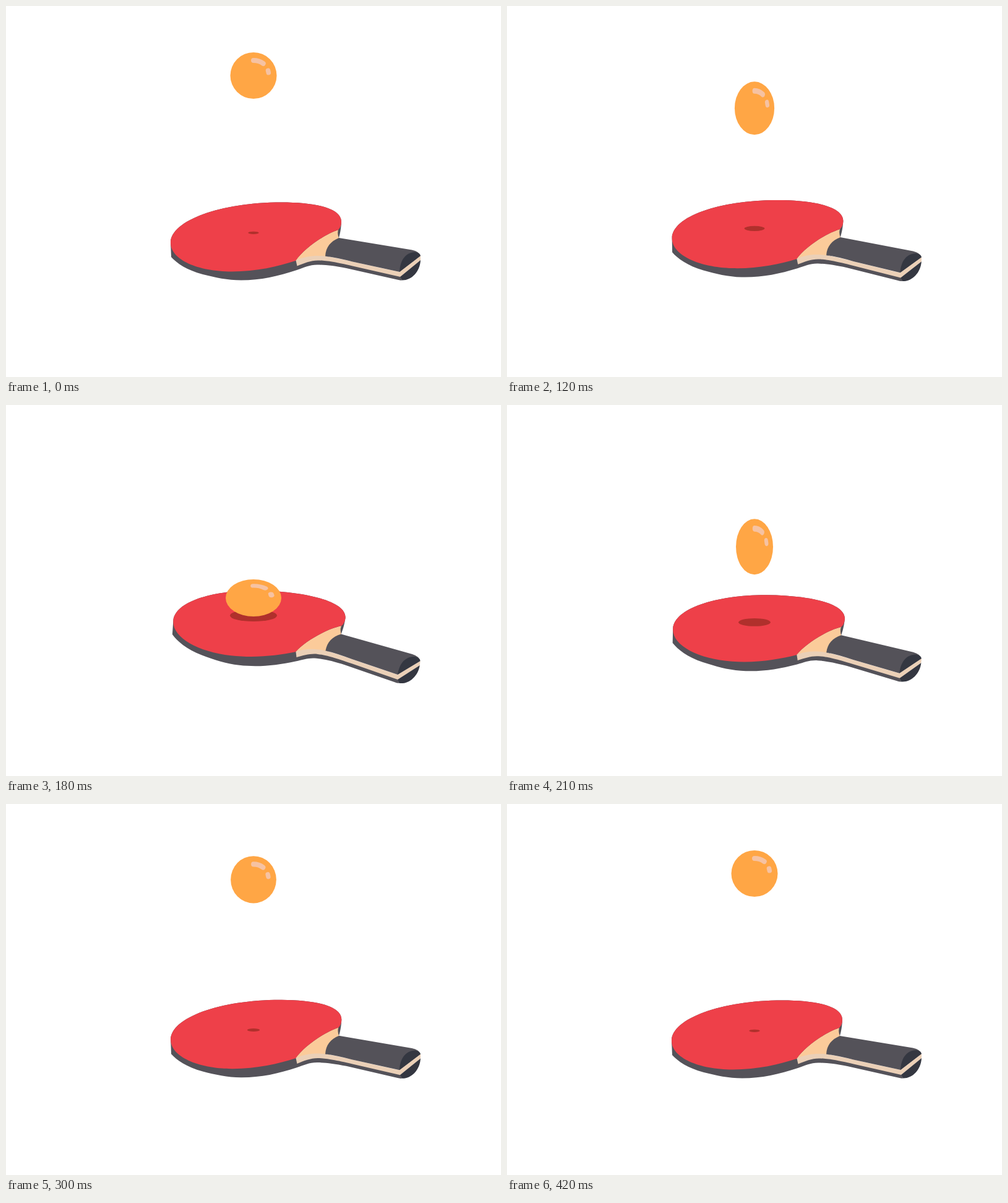
An HTML page that plays this animation: 800x600 px, repeating every 0.45 s.

```html
<!DOCTYPE html>
<html lang="en">
<head>
<meta charset="utf-8">
<title>Bouncing ball</title>
<style>
  html, body { margin: 0; width: 100%; height: 100%; overflow: hidden; background: #fff; }
  svg { display: block; width: 100vw; height: 100vh; }
  .red { fill: #ee4049; }
  .dark { fill: #545259; }
  .cap { fill: #343741; }
  .wood { fill: #fbcb9a; }
  .edge { fill: #ebd0b7; }
  .shadow { fill: #b0302c; }
  .ball { fill: #ffa645; }
  .shine { fill: none; stroke: #f6c2a2; stroke-linecap: round; }
</style>
</head>
<body>
<svg viewBox="0 0 800 600">
  <g id="paddle">
    <!-- rubber rim, neck and underside -->
    <path class="dark" d="M266 383C266 347 347 317.5 445 317.5C500 317.5 542 327 542 349
      C541.5 360 540 368 538 375L516 404L637 437L640 443.5Q637 444 632 442.5L550 424
      C530 420 516 418.5 503 418.5C490 418.5 482 423 470 427C440 437 412 443.5 380 443.5
      C358 443.5 338 439 318 434C292 427 276 416 267 406Z"/>
    <path class="wood" d="M468 412C482 392 515 369 537 362Q535 368 538 375L525 400L516 405L490 408Z"/>
    <path class="edge" d="M468.500 411.500C480 406 492 404 504 404Q512 404 518 405
      C540 408 560 414 636 430L670 404V411L637 438L560 420.500C530 413.500 516 411.500 504 411.500
      C492 411.500 482 416 470.500 420.500Z"/>
    <path class="dark" d="M516 404.500C517 390 524 381 538 375L656 394.500Q668 397 669.500 404L636 430
      L560 413.500Q535 407 516 404.500Z"/>
    <path class="cap" d="M636 430C637 410 646 399 661 398Q669 399 670 404Z"/>
    <path class="cap" d="M637 438L670 411C669 430 655 444 640 443.500Z"/>
    <path class="red" d="M468 412C440 421 405 429.500 365 429.500C310 429.500 266 410 266 383
      C266 347 347 317.500 445 317.500C500 317.500 542 327 542 349Q542 357 537 362
      C515 369 482 392 468 412Z"/>
  </g>
  <ellipse id="shadow" class="shadow" cx="400"/>
  <g id="ball">
    <circle class="ball" r="37.500"/>
    <path class="shine" stroke-width="8" d="M0 -24.500C6 -24.500 11 -23 15.700 -19.500"/>
    <path class="shine" stroke-width="7.500" d="M23.500 -8.200L24.300 -4.700"/>
  </g>
</svg>
<script>
  const LOOP = 450, STEP = 30, HIT = 180;
  const [paddle, shadow, ball] = ['paddle', 'shadow', 'ball'].map(id => document.getElementById(id));

  const mix = (a, b, k) => a + (b - a) * k;
  const clamp = v => Math.min(1, Math.max(0, v));

  function bezier(x1, y1, x2, y2) {
    const at = (a, b, u) => 3 * (1 - u) * (1 - u) * u * a + 3 * (1 - u) * u * u * b + u * u * u;
    return x => {
      let lo = 0, hi = 1;
      for (let i = 0; i < 24; i++) {
        const mid = (lo + hi) / 2;
        if (at(x1, x2, mid) < x) lo = mid; else hi = mid;
      }
      return at(y1, y2, (lo + hi) / 2);
    };
  }

  const fall = bezier(.7, 0, .85, .5);
  const rise = bezier(.7, 0, .79, .5);
  const lift = bezier(.7, 0, 1, .52);
  const settle = bezier(.7, 0, .77, .51);
  const stretch = bezier(.85, 0, .65, .8);

  function draw(t) {
    const near = clamp(1 - Math.abs(t - HIT) / HIT); // 0 at rest, 1 at impact
    const falling = t <= HIT;
    const drop = (falling ? fall : rise)(near);
    const tilt = 6.4 * (falling ? lift : settle)(near);

    // stretches in flight, then squashes within one step of impact
    const peak = 1 - STEP / HIT;
    const q = near <= peak
      ? .2 * stretch(near / peak)
      : mix(.2, -.2, (near - peak) / (1 - peak));

    const rx = mix(8.7, 38, drop);
    paddle.setAttribute('transform', `rotate(${tilt} 581 405)`);
    shadow.setAttribute('cy', mix(366.8, 340.5, drop));
    shadow.setAttribute('rx', rx);
    shadow.setAttribute('ry', rx / 4);
    ball.setAttribute('transform',
      `translate(400 ${mix(112.5, 312, drop)}) scale(${1 - q} ${1 + q})`);
  }

  const start = performance.now();
  function tick() {
    const t = (performance.now() - start) % LOOP;
    draw(Math.floor(t / STEP) * STEP);
    requestAnimationFrame(tick);
  }
  tick();
</script>
</body>
</html>
```
